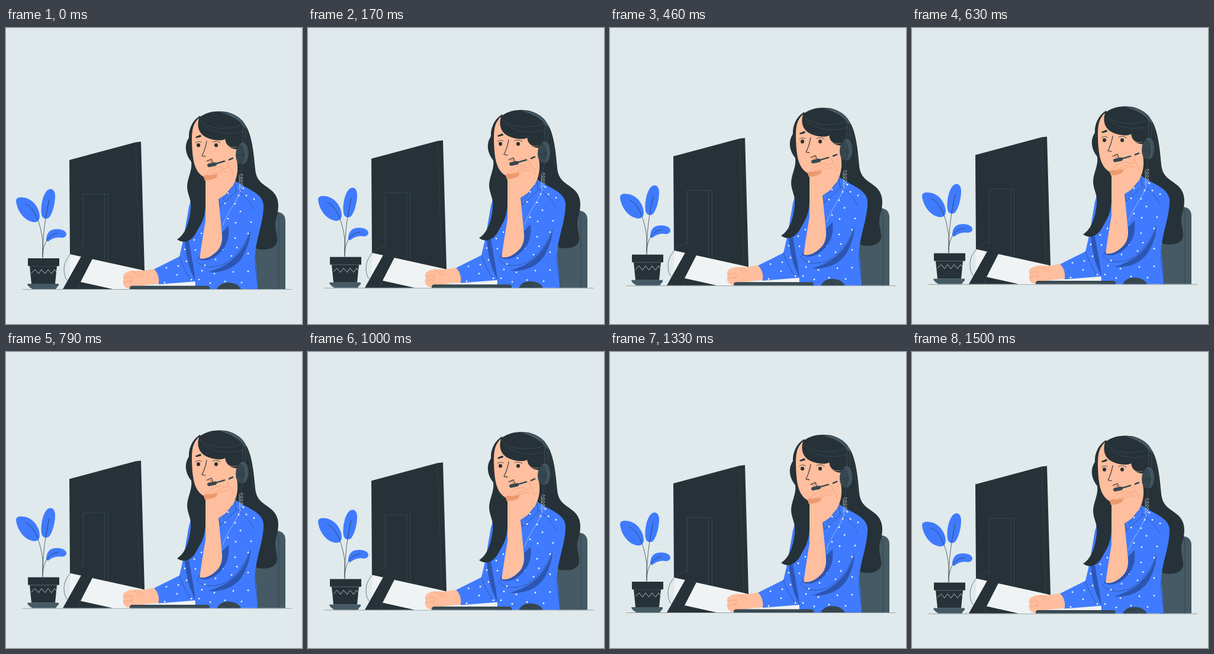
An HTML page with a canvas that plays this animation: 500 by 500 pixels, repeating every 1.54 s.

```html
<!DOCTYPE html>
<html lang="en">
<head>
<meta charset="utf-8">
<title>Support desk</title>
<style>
  html, body { margin: 0; width: 100%; height: 100%; overflow: hidden; background: #e0eaec; }
  canvas { display: block; width: 500px; height: 500px; }
</style>
</head>
<body>
<canvas id="stage" width="500" height="500"></canvas>
<script>
const ctx = document.getElementById('stage').getContext('2d');
const LOOP = 1540, STEPS = 37, RISE = 10.4;
const BG = '#e0eaec', INK = '#263238', SLATE = '#455a64', STEEL = '#37474f', BLUE = '#407bff',
  NAVY = '#2d56b3', SKIN = '#ffbe9d', TAN = '#eb996e', PAPER = '#f0f3f4';

function fill(color, d) {
  ctx.fillStyle = color;
  ctx.fill(new Path2D(d));
}

function line(color, d, width = 0.7) {
  ctx.strokeStyle = color;
  ctx.lineWidth = width;
  ctx.stroke(new Path2D(d));
}

function oval(color, x, y, rx, ry) {
  ctx.fillStyle = color;
  ctx.beginPath();
  ctx.ellipse(x, y, rx, ry, 0, 0, Math.PI * 2);
  ctx.fill();
}

function drawPlant() {
  fill(BLUE, 'M17 292C17 285 27 285 36 288C49 293 57 307 57 319C56 328 49 330 40 326C27 321 18 305 17 292Z');
  fill(BLUE, 'M60 315C58 302 62 282 69 275C75 269 83 272 83 284C83 298 78 314 73 320C68 324 61 322 60 315Z');
  fill(BLUE, 'M68 359C68 349 72 341 82 340C91 339 101 341 102 348C102 353 97 355 92 354C84 353 77 356 71 361Z');
  line(INK, 'M33 297C48 303 58 328 62 359V388');
  line(INK, 'M73 290C67 318 62 345 62 388');
  line(INK, 'M62 382C64 359 74 348 88 347');

  fill(SLATE, 'M36 432H89V435L85 439H41L37 435Z');
  fill(SLATE, 'M41 438H86L84 441H44Z');
  fill(INK, 'M37 389H90V402H37Z');
  fill(INK, 'M40 402H86L83 432H43Z');
  line(SLATE, 'M40 402.5H87', 0.6);
  line(SLATE, 'M37 434.7H88', 0.5);
  line(PAPER, 'M43 414L49 408L55 415L60 408L66 415L71 408L77 415L82 408L85 412', 0.7);
}

function drawMonitor() {
  fill(PAPER, 'M109 381L128 386L107 419Z');
  fill(PAPER, 'M144 390L235 409L210 441H179L126 429Z');
  fill(INK, 'M107 223L219 193L228 192L234 410L226 408L108 382Z');
  line(SLATE, 'M219 193L226 408', 0.35);
  line(SLATE, 'M130.5 372V280.5H172.5V396M166.5 281V393', 0.55);
  fill(INK, 'M128 384L146 390L126 429L180 441H96Z');
  line(SLATE, 'M126 429L121 441', 0.5);
  line(INK, 'M131 370C111 374 98 391 98 408Q98 420 103 426', 0.6);
  line(SLATE, 'M131 370C122 372 114 376 109 381', 0.5);
}

function drawChairAndBackHair() {
  fill(SLATE, 'M420 310H455Q472 311 472 326V441H420Z');
  line(INK, 'M454 310Q461 313 461 326V441', 0.5);
  fill(INK, 'M352 142C378 137 401 151 410 175C417 194 419 218 421 239C423 260 436 264 448 274C464 287 461 307 456 323C452 338 459 348 458 360C457 371 443 377 424 373L370 290L345 200Z');
}

function drawDots() {
  const dots = [
    382, 266, 401, 271, 375, 279, 393, 283, 419, 289, 406, 283, 396, 310, 387, 297,
    370, 296, 388, 329, 414, 328, 375, 322, 409, 347, 387, 355, 409, 381, 390, 371,
    370, 347, 366, 374, 336, 401, 354, 391, 381, 385, 409, 411, 384, 412, 398, 430,
    370, 428, 352, 415, 345, 431, 331, 410, 326, 425, 271, 405, 291, 402, 268, 430,
    289, 417, 305, 394, 302, 374, 320, 375, 318, 358, 313, 425, 330, 347, 309, 342
  ];
  for (let i = 0; i < dots.length; i += 2) oval('#fff', dots[i], dots[i + 1], 1.35, 1.35);
}

function drawShirt() {
  fill(BLUE, 'M386 257C405 272 432 277 435 298C436 325 422 357 421 383L426 441H320V428L258 433Q258 418 249 408L293 386L299 360L309 302L314 286L340 270Z');
  fill(NAVY, 'M302 360C304 381 307 396 312 410L320 428C318 408 314 390 309 360Z');
  fill(NAVY, 'M341 412C368 415 388 403 398 389C407 375 412 358 413 345C408 358 402 371 390 384C376 399 358 408 341 412Z');
  line(INK, 'M320 428V441M421 384C419 400 424 419 426 441', 0.5);
  line(INK, 'M293 386C298 402 306 416 312 425', 0.5);
  line(INK, 'M322 391C326 405 350 407 370 398C390 386 405 365 413 343', 0.5);
  line(INK, 'M386 257L389 276L362 301L359 287', 0.5);
  line(INK, 'M386 263L366 290M389 273C401 282 413 293 419 307', 0.4);
  drawDots();
  fill(NAVY, 'M364 346L376 334C378 352 374 366 363 378C350 392 334 396 324 389L328 383Z');
}

function drawHead() {
  fill(INK, 'M328 148C314 156 308 173 309 185C301 197 302 212 313 226C315 241 306 254 306 268C306 281 314 290 312 306C310 326 304 348 289 357C299 365 312 361 320 348C327 335 334 326 336 310L342 260L333 170Z');
  fill(SKIN, 'M326 152C314 163 314 176 314 194C315 219 317 238 330 249Q338 256 353 254L388 242L392 190L365 155Z');
  fill(TAN, 'M333 249Q344 251 356 246L358 254Q349 261 336 258Z');
  fill(INK, 'M326 152C337 142 360 136 383 146C400 154 410 173 408 197L389 205C378 204 371 197 370 188C362 191 353 190 344 187C325 181 322 166 326 152Z');
  line(SKIN, 'M370 188C370 198 379 204 389 201', 0.6);
  line(SLATE, 'M328 156C343 172 376 173 401 163M333 164C352 180 383 181 402 173', 0.55);
  line(SLATE, 'M407 175C413 194 414 217 418 237', 0.4);

  fill(INK, 'M320 184L328 180.5Q331 182 329 184L321 186Z');
  line(INK, 'M320 194Q324 190 330 193M349 193Q355 189 362 194', 0.8);
  oval(INK, 325, 198, 3, 3.2);
  oval(INK, 355, 198, 3, 3.2);
  line(INK, 'M339 191C337 203 334 210 331 216L337 217', 1.1);
  line(INK, 'M339 225L347 221.5L350 229', 1.1);
  fill(TAN, 'M341 226L347 223L349 229Z');
}

function drawHeadset() {
  fill(SLATE, 'M361 142C384 141 403 154 406 169L402 168C395 155 381 148 361 142Z');
  line(INK, 'M372 142C387 145 400 156 404 168', 0.5);
  line(SLATE, 'M400 167V194M405 168V194', 0.8);
  oval(SLATE, 400, 212, 9.5, 18);
  oval(STEEL, 396, 214, 8, 16);
  line(INK, 'M391 200C398 193 408 201 408 212C408 225 402 231 396 230', 0.6);
}

function drawBoom() {
  line(STEEL, 'M355 229L369 225', 2.4);
  line(STEEL, 'M377 222.5L383 220', 2.6);
  line(INK, 'M390 217L402 212.5Q405 216 399 219', 0.7);
  line(STEEL, 'M343 232L353 230', 6);
}

function drawCord() {
  line(SLATE, 'M399 230L397 244', 0.6);
  ctx.beginPath();
  for (let a = 0; a <= 1; a += 0.005) {
    const turn = a * Math.PI * 10;
    ctx.lineTo(397 + 3 * Math.sin(turn), 247 + 26 * a + 2.6 * Math.cos(turn));
  }
  ctx.strokeStyle = BG;
  ctx.lineWidth = 0.7;
  ctx.stroke();
  line('#d5e0f5', 'M396 275C389 295 374 311 366 334', 0.6);
}

function drawRaisedArm() {
  fill(SKIN, 'M337 258L338 244Q342 235 356 229L378 222Q387 218 390 224C393 239 390 254 384 265L371 281L359 289L365 350Q366 364 359 374C350 385 337 392 327 389Q332 354 337 325Z');
  fill(TAN, 'M337 248Q347 250 357 246L356 252Q347 258 337 257Z');
  line(TAN, 'M340 246Q353 233 366 235Q370 237 365 239L346 248');
  line(TAN, 'M365 224Q378 225 376 234Q373 238 368 238M358 247Q368 240 376 243');
  line(TAN, 'M352 249Q355 249 358 247M376 234Q384 241 383 248');
}

function drawRestingHand() {
  fill(PAPER, 'M240 435L320 429V437H240Z');
  fill(SKIN, 'M200 415Q207 409 219 410L233 410L250 407Q260 417 258 432L236 434L224 437L214 440Q203 442 199 435Q196 429 199 424Q196 419 200 415Z');
  line(TAN, 'M199 423Q208 418 213 421M200 430Q208 426 213 429M215 411Q222 414 225 421');
  line(TAN, 'M213 421Q215 425 211 429M222 410Q226 417 233 419', 0.6);
}

function drawDeskItems() {
  fill(STEEL, 'M212 435.5H341Q345 437 344 441H209Q208 437 212 435.5Z');
  line(SLATE, 'M211 438.5H343', 0.6);
  fill(STEEL, 'M356 441Q361 431 374 430Q391 430 397 441Z');
  line(INK, 'M364 434Q374 433 379 441', 0.6);
}

function drawScene() {
  line(INK, 'M28 441.6H482', 0.4);
  drawPlant();
  drawChairAndBackHair();
  drawMonitor();
  drawShirt();
  drawHead();
  drawHeadset();
  drawRaisedArm();
  drawBoom();
  drawCord();
  drawRestingHand();
  drawDeskItems();
}

// Constant-speed rise and fall, advanced at 24 steps per second.
function liftAt(time) {
  const step = Math.min(STEPS - 1, Math.floor((time + 5) * STEPS / LOOP));
  const phase = ((step + 1.5) % STEPS) / STEPS;
  return RISE * (1 - Math.abs(1 - 2 * phase));
}

const restLift = liftAt(0);
ctx.lineJoin = 'round';
ctx.lineCap = 'round';

let start;
function render(now) {
  start ??= now;
  ctx.fillStyle = BG;
  ctx.fillRect(0, 0, 500, 500);
  ctx.save();
  ctx.translate(0, restLift - liftAt((now - start) % LOOP));
  drawScene();
  ctx.restore();
  requestAnimationFrame(render);
}
requestAnimationFrame(render);
</script>
</body>
</html>
```
